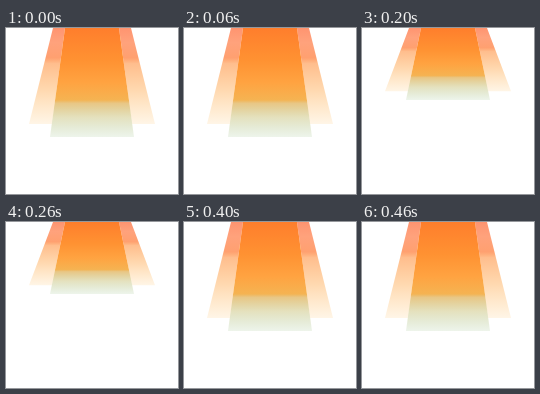
Write an HTML page that moves like this. It is 172 px wide and 166 px high and loops after 500 ms.

```html
<!DOCTYPE html>
<html lang="en">
<head>
<meta charset="utf-8">
<title>Pulsing light beam</title>
<style>
  html, body { margin: 0; height: 100%; overflow: hidden; background: #fff; }
  svg { display: block; width: 100vw; height: 100vh; }
</style>
</head>
<body>
<svg viewBox="0 0 172 166">
  <defs>
    <linearGradient id="outer" x2="0" y2="1">
      <stop offset="0" stop-color="#ff9470"/>
      <stop offset=".15" stop-color="#ffa27c"/>
      <stop offset=".31" stop-color="#ffa070"/>
      <stop offset=".37" stop-color="#ff9a50" stop-opacity=".65"/>
      <stop offset=".65" stop-color="#ffa444" stop-opacity=".42"/>
      <stop offset="1" stop-color="#ffb850" stop-opacity=".14"/>
    </linearGradient>
    <linearGradient id="inner" x2="0" y2="1">
      <stop offset="0" stop-color="#ff7e2c"/>
      <stop offset=".3" stop-color="#ff9232"/>
      <stop offset=".5" stop-color="#ffa341"/>
      <stop offset=".66" stop-color="#f5b352"/>
      <stop offset=".69" stop-color="#dfae50" stop-opacity=".7"/>
      <stop offset=".82" stop-color="#bdb45c" stop-opacity=".4"/>
      <stop offset="1" stop-color="#8cb878" stop-opacity=".15"/>
    </linearGradient>
    <radialGradient id="glow" gradientUnits="userSpaceOnUse" r="1"
                    gradientTransform="translate(86 18) scale(36 16)">
      <stop offset="0" stop-color="#ffb032"/>
      <stop offset=".5" stop-color="#ffaa32" stop-opacity=".8"/>
      <stop offset="1" stop-color="#ff9c30" stop-opacity="0"/>
    </radialGradient>
  </defs>
  <g id="beam">
    <path fill="url(#outer)" d="M47 0H59L45.8 96H23ZM113 0H125L149 96H126.2Z"/>
    <path fill="url(#inner)" d="M59 0H113L128 109H44Z"/>
    <path fill="url(#glow)" d="M59 0H113L120 52H52Z"/>
  </g>
</svg>
<script>
  const beam = document.getElementById('beam');
  const stepMs = 100;
  const lengths = [1, 0.8, 0.66, 0.8, 1];

  function draw(now) {
    const step = Math.floor(now / stepMs) % lengths.length;
    beam.setAttribute('transform', `scale(1 ${lengths[step]})`);
    requestAnimationFrame(draw);
  }
  draw(performance.now());
</script>
</body>
</html>
```
